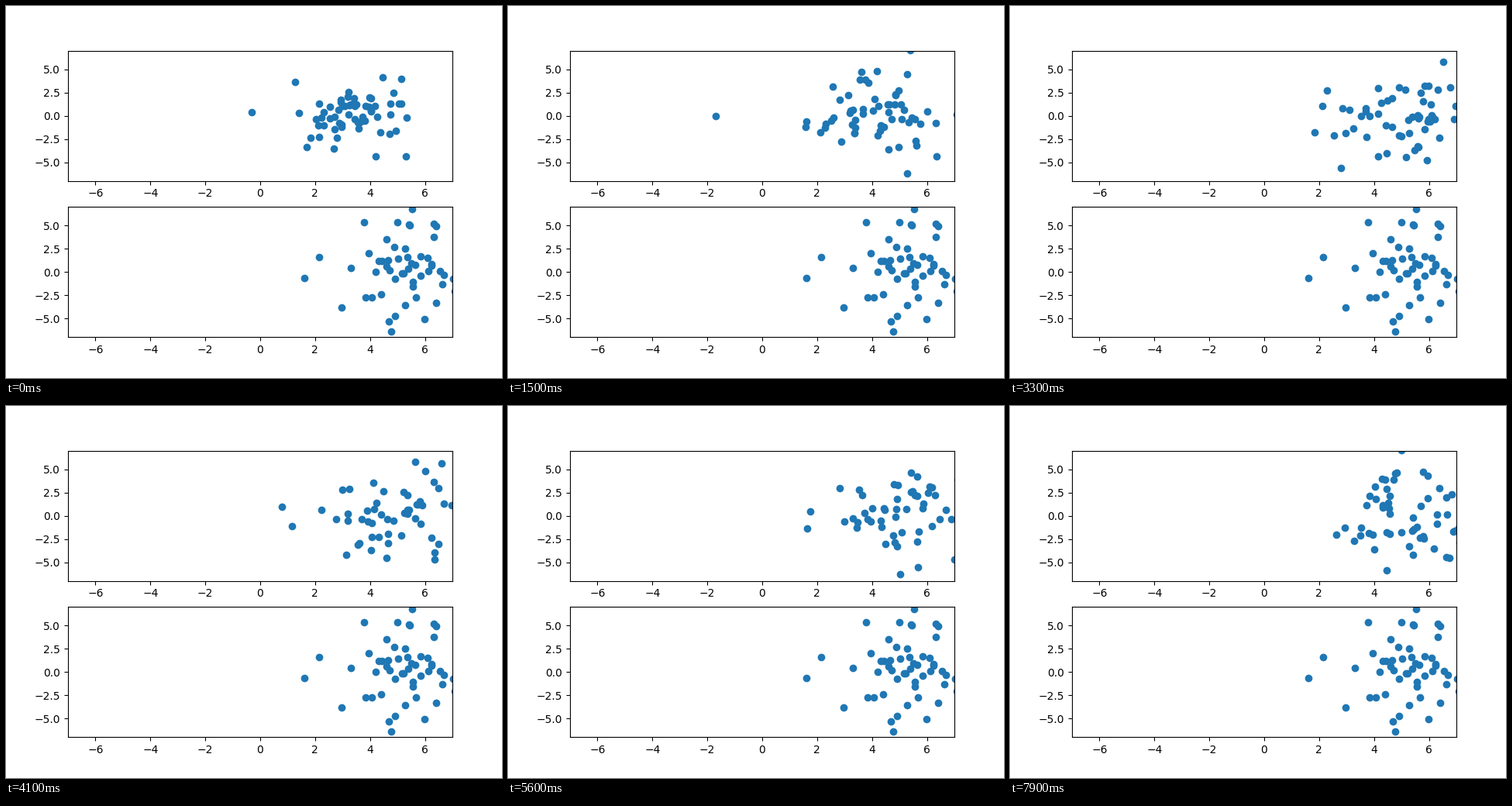
Animation, 640 px wide and 480 px high, one loop 8000 ms. Source, as a matplotlib script:

```python
import numpy as np
import matplotlib.pyplot as plt
from matplotlib.animation import FuncAnimation

FRAMES, INTERVAL = 80, 100
LIMIT = 7

# Isolated points that give each cloud its outline.
START_RIM = [(-.3, .4), (1.27, 3.6), (1.69, -3.4), (2.68, -3.55),
             (4.21, -4.4), (5.31, -4.4), (4.46, 4.1), (5.14, 4)]
GOAL_RIM = [(1.61, -.65), (2.14, 1.6), (2.96, -3.8), (4.77, -6.4),
            (5.98, -5.05), (5.53, 6.75), (7.03, -.7), (7.09, -2.05)]


def make_cloud(rim, count, mean, sd, low, high, seed):
    """Outline points filled up with normal points inside a box."""
    rng = np.random.default_rng(seed)
    points = rng.normal(mean, sd, (20 * count, 2))
    inside = ((points > low) & (points < high)).all(axis=1)
    return np.vstack([rim, points[inside][:count - len(rim)]])


def diffuse(points, steps, seed):
    """Noisy drift towards a centre; y spreads more at larger x."""
    rng = np.random.default_rng(seed)
    pull, centre = 0.05, 5.3
    path = [points]
    for _ in range(steps - 1):
        x, y = path[-1].T
        kick_x, kick_y = rng.normal(size=(2, len(x)))
        spread = 0.19 * np.clip(x, 1.5, 6)
        path.append(np.column_stack([
            x + pull * (centre - x) + 0.48 * kick_x,
            y - pull * y + spread * kick_y,
        ]))
    return path


start = make_cloud(START_RIM, 62, mean=(3.2, .2), sd=(1.1, 1.5),
                   low=(1.1, -2.4), high=(5.4, 3.3), seed=3)
goal = make_cloud(GOAL_RIM, 53, mean=(5.5, 1), sd=(.95, 2.8),
                  low=(3.3, -5.8), high=(6.7, 6.2), seed=8)
path = diffuse(start, FRAMES, seed=11)

fig, axes = plt.subplots(2, figsize=(6.4, 4.8), dpi=100)
for ax in axes:
    ax.set(xlim=(-LIMIT, LIMIT), ylim=(-LIMIT, LIMIT),
           yticks=np.arange(-5, 5.1, 2.5))

cloud = axes[0].scatter(*start.T)
axes[1].scatter(*goal.T)


def update(i):
    cloud.set_offsets(path[i])
    return cloud,


anim = FuncAnimation(fig, update, frames=FRAMES, interval=INTERVAL,
                     repeat=True, repeat_delay=0)
plt.show()
```
